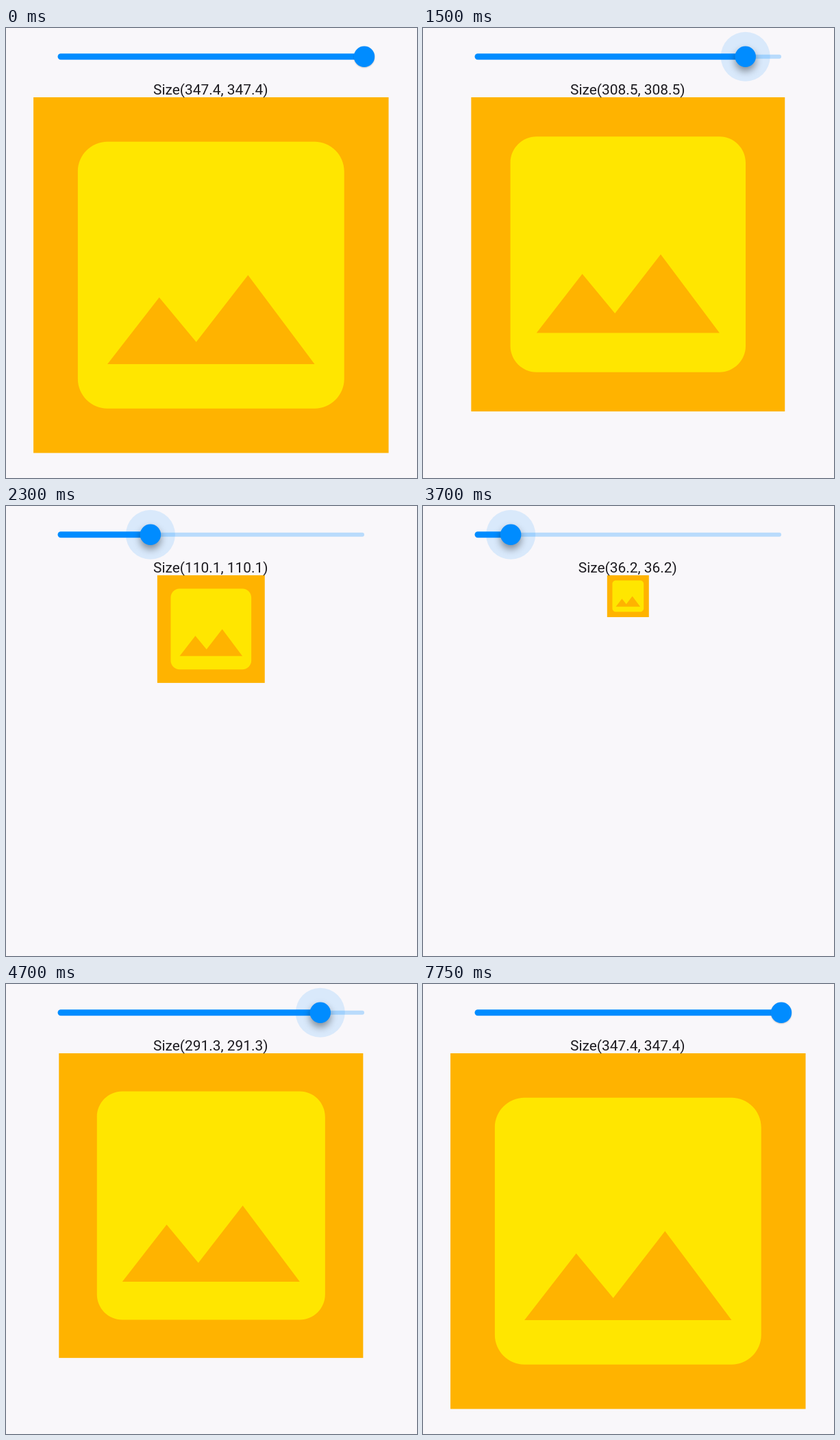
Animation of 600 by 656 pixels, one loop 7.8 s. Source, as an HTML page with a canvas:

```html
<!DOCTYPE html>
<html lang="en">
<head>
<meta charset="utf-8">
<title>Icon size slider</title>
<style>
  html, body { margin: 0; width: 100%; height: 100%; overflow: hidden; background: #f9f7fa; }
  canvas { display: block; width: 600px; height: 656px; }
</style>
</head>
<body>
<canvas id="stage" width="600" height="656"></canvas>
<script>
const ctx = document.getElementById('stage').getContext('2d');
const LOOP = 7800, STEP = 50, LAYOUT_LAG = 1000 / 60;
const UNIT = 518.5 / 347.4;
const CENTER = 299.3, BOX_TOP = 101;
const TRACK = { left: 75.5, right: 523, y: 41.7 };
const MAX = 347.4;
const BLUE = '#008cff', AMBER = '#ffb300', YELLOW = '#ffe600';

// Drag gesture: [time ms, size, size per second]
const DRAG = [
  [700, MAX, 0],
  [1500, 308.5, -96],
  [2300, 110.1, -294],
  [2750, 0, 0],
  [3300, 0, 0],
  [3700, 36.2, 282],
  [4700, 291.3, 372],
  [4910, MAX, 0],
];
const PRESS = 470, RELEASE = 5870, FADE = 100;

const icon = new Path2D(
  'M21 19V5c0-1.1-.9-2-2-2H5c-1.1 0-2 .9-2 2v14c0 1.1.9 2 2 2h14c1.1 0 2-.9 2-2z' +
  'M8.5 13.5l2.5 3.01L14.5 12l4.5 6H5l3.5-4.5z');

const clamp = (v, lo, hi) => Math.min(hi, Math.max(lo, v));
const ease = p => p * p * (3 - 2 * p);

// Cubic Hermite interpolation through the gesture points
function sizeAt(t) {
  const i = DRAG.findIndex(k => k[0] > t);
  if (i <= 0) return MAX;
  const [t0, a, va] = DRAG[i - 1], [t1, b, vb] = DRAG[i];
  const span = (t1 - t0) / 1000, p = (t - t0) / (t1 - t0), q = 1 - p;
  const size = a * q * q * (1 + 2 * p) + b * p * p * (3 - 2 * p)
    + span * p * q * (va * q - vb * p);
  return clamp(size, 0, MAX);
}

function pressAt(t) {
  const down = ease(clamp((t - PRESS) / FADE, 0, 1));
  const up = ease(clamp((t - RELEASE) / FADE, 0, 1));
  return down - up;
}

function circle(x, y, r) {
  ctx.beginPath();
  ctx.arc(x, y, r, 0, Math.PI * 2);
  ctx.fill();
}

function bar(x0, x1, height, radii) {
  ctx.beginPath();
  ctx.roundRect(x0, TRACK.y - height / 2, x1 - x0, height, radii);
  ctx.fill();
}

function drawSlider(size, press) {
  const x = TRACK.left + (TRACK.right - TRACK.left) * size / MAX;
  ctx.fillStyle = 'rgba(0, 140, 255, .26)';
  bar(x, TRACK.right, 6, [0, 3, 3, 0]);
  ctx.fillStyle = BLUE;
  bar(TRACK.left, x, 9, [4.5, 0, 0, 4.5]);

  ctx.fillStyle = 'rgba(0, 140, 255, .13)';
  if (press > 0) circle(x, TRACK.y, 36 * press);

  ctx.save();
  ctx.shadowColor = `rgba(0, 0, 0, ${.2 + .2 * press})`;
  ctx.shadowBlur = 2 + 9 * press;
  ctx.shadowOffsetY = 1 + 5 * press;
  ctx.fillStyle = BLUE;
  circle(x, TRACK.y, 15.2);
  ctx.restore();
}

function drawLabel(size) {
  const n = size.toFixed(1);
  ctx.font = '20.9px Roboto, sans-serif';
  ctx.textAlign = 'center';
  ctx.fillStyle = '#1d1b20';
  ctx.fillText(`Size(${n}, ${n})`, CENTER - .5, 97);
}

function drawImageBox(size) {
  const side = size * UNIT, left = CENTER - side / 2;
  ctx.fillStyle = AMBER;
  ctx.fillRect(left, BOX_TOP, side, side);
  ctx.save();
  ctx.translate(left, BOX_TOP);
  ctx.scale(side / 24, side / 24);
  ctx.fillStyle = YELLOW;
  ctx.fill(icon, 'evenodd');
  ctx.restore();
}

function draw(now) {
  const t = Math.floor(now % LOOP / STEP) * STEP;
  const size = sizeAt(t + LAYOUT_LAG);
  ctx.fillStyle = '#f9f7fa';
  ctx.fillRect(0, 0, 600, 656);
  drawSlider(size, pressAt(t));
  drawImageBox(size);
  drawLabel(sizeAt(t)); // the label reports the previous layout
}

const start = performance.now();
function tick() {
  draw(performance.now() - start);
  requestAnimationFrame(tick);
}
tick();
</script>
</body>
</html>
```
